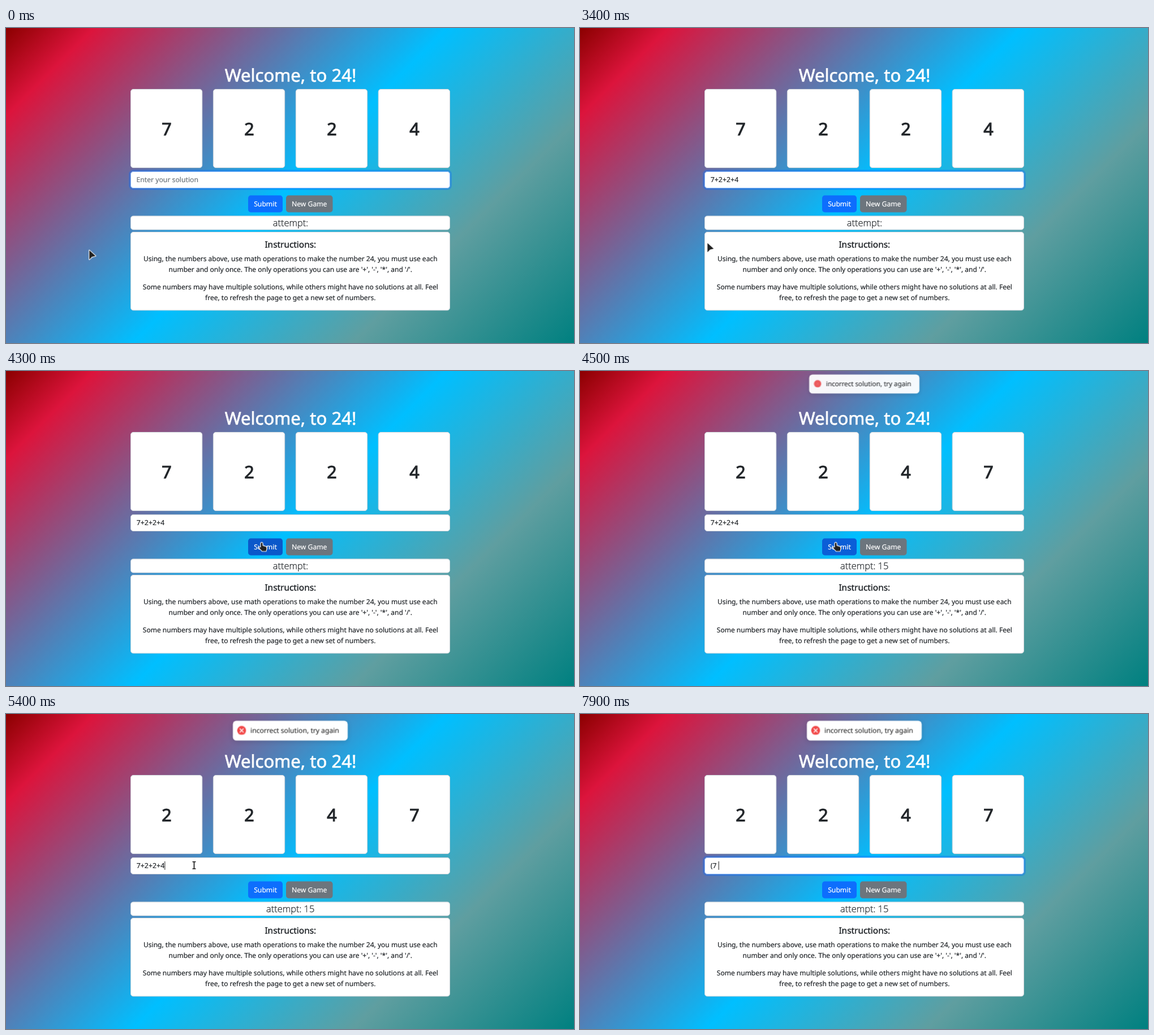
Write an HTML page that moves like this. It is 1004x558 px and loops after 8 s.

```html
<!DOCTYPE html>
<html lang="en">
<head>
<meta charset="utf-8">
<title>Welcome, to 24!</title>
<style>
html, body { margin: 0; width: 100%; height: 100%; overflow: hidden; }
body { background: linear-gradient(135deg, darkred, crimson 10%, deepskyblue 50%, cadetblue 75%, teal); }
svg { display: block; width: 1004px; height: 558px; }
text {
  font: 12.02px "Noto Sans", "Open Sans", sans-serif;
  fill: #212529; stroke: #212529; stroke-width: .2px;
  white-space: pre; text-rendering: geometricPrecision;
}
.mid { text-anchor: middle; }
.title { font-size: 31.1px; fill: #fff; stroke: #fff; stroke-width: .7px; }
.digits { font-size: 30.5px; stroke-width: 1px; }
.heading { font-size: 15.4px; stroke-width: .4px; }
.attempt { font: 300 16.4px "Open Sans", "Noto Sans", sans-serif; stroke-width: .25px; }
.label { font-size: 12.2px; fill: #fff; stroke: #fff; }
.entry { font-size: 12.4px; }
.picked { fill: #fff; stroke: #fff; }
.hint { font-size: 12.2px; fill: #6c757d; stroke: #6c757d; }
.notice { font-size: 12.15px; fill: #363636; stroke: #363636; }
.panel { fill: #fff; stroke: #ced4da; stroke-width: 1; }
.glow { fill: none; stroke: #0d6efd; stroke-opacity: .35; stroke-width: 3; }
.edge { fill: none; stroke: #86b7fe; }
.toast-box { fill: #fff; filter: drop-shadow(0 2px 4px rgba(0, 0, 0, .14)); }
.pointer path { stroke: #fff; stroke-width: 1.2; stroke-linejoin: round; paint-order: stroke; fill: #222; }

/* Every change is a hard step; 1% is 80 ms */
.step { animation: 8s step-end infinite; }
.hint { animation-name: hint; }
.first { animation-name: first; }
.second { animation-name: second; }
.selection { animation-name: selection; }
.cover { animation-name: cover; }
.caret { animation-name: caret; }
.before { animation-name: before; }
.after { animation-name: after; }
.focus { animation-name: focus; }
.submit { fill: #0d6efd; animation-name: submit; }
.toast { animation-name: toast; }
.icon { animation-name: icon; }
.cross { animation-name: cross; }
.pointer { animation-name: pointer; }
.arrow { animation-name: arrow; }
.hand { animation-name: hand; }
.beam { animation-name: beam; }

@keyframes hint { 0% { opacity: 1 } 11.25%, 100% { opacity: 0 } }
@keyframes first { 0%, 88.75%, 100% { opacity: 0 } 11.25% { opacity: 1 } }
@keyframes second { 0% { opacity: 0 } 88.75%, 100% { opacity: 1 } }
@keyframes selection { 0%, 88.75%, 100% { opacity: 0 } 72.5% { opacity: 1 } }
@keyframes before { 0% { opacity: 1 } 55%, 100% { opacity: 0 } }
@keyframes after { 0% { opacity: 0 } 55%, 100% { opacity: 1 } }
@keyframes cover {
  0% { transform: translateX(0) }
  11.25% { transform: translateX(7.1px) }
  15% { transform: translateX(14.2px) }
  20% { transform: translateX(21.3px) }
  23.75% { transform: translateX(28.4px) }
  27.5% { transform: translateX(35.5px) }
  35% { transform: translateX(49.6px) }
  88.75% { transform: translateX(3.7px) }
  95% { transform: translateX(10.9px) }
  97.5%, 100% { transform: translateX(14.1px) }
}
@keyframes caret {
  0%, 42.5%, 72.5% { opacity: 0 }
  11.25%, 67.5%, 88.75%, 100% { opacity: 1 }
}
@keyframes focus {
  0%, 70%, 100% { opacity: 1 }
  52.5% { opacity: .5 }
  53.75% { opacity: 0 }
  68.75% { opacity: .7 }
}
@keyframes submit {
  0%, 61.25%, 100% { fill: #0d6efd }
  48.75% { fill: #0c66ea }
  50%, 55% { fill: #0b5ed7 }
  52.5% { fill: #0a58ca }
}
@keyframes toast {
  0% { opacity: 0; transform: none }
  55% { opacity: .81; transform: translateY(-27px) scale(.85) }
  56.25% { opacity: .95; transform: translateY(-6.5px) scale(.96) }
  57.5%, 100% { opacity: 1; transform: none }
}
@keyframes icon {
  0% { opacity: 0; transform: scale(0) }
  56.25% { opacity: .9; transform: scale(.85) }
  57.5% { opacity: 1; transform: scale(1.04) }
  58.75%, 100% { opacity: 1; transform: none }
}
@keyframes cross {
  0% { opacity: 0; transform: scale(.5) }
  56.25% { opacity: .15; transform: scale(.6) }
  57.5% { opacity: 1; transform: scale(.8) }
  58.75%, 100% { opacity: 1; transform: none }
}
@keyframes pointer {
  0% { transform: translate(147.3px, 393.8px) }
  1.25% { transform: translate(144.3px, 387.8px) }
  42.5% { transform: translate(225.3px, 381px) }
  43.75% { transform: translate(264px, 371px) }
  45% { transform: translate(320px, 352px) }
  46.25% { transform: translate(374px, 333px) }
  47.5% { transform: translate(420px, 317px) }
  48.75% { transform: translate(446px, 308px) }
  50% { transform: translate(452px, 304.5px) }
  60% { transform: translate(446px, 302px) }
  61.25% { transform: translate(372px, 273px) }
  62.5% { transform: translate(336px, 269px) }
  63.75% { transform: translate(334px, 269px) }
  65%, 100% { transform: translate(332.5px, 268px) }
}
@keyframes arrow { 0%, 42.5% { opacity: 1 } 12.5%, 48.75%, 100% { opacity: 0 } }
@keyframes hand { 0%, 61.25%, 100% { opacity: 0 } 48.75% { opacity: 1 } }
@keyframes beam { 0%, 90%, 100% { opacity: 0 } 61.25% { opacity: 1 } }
</style>
</head>
<body>
<svg viewBox="0 0 1004 558">
  <defs><rect id="card" class="panel" y="108.5" width="126.3" height="139" rx="4.5"/></defs>

  <text class="title mid" x="503" y="95">Welcome, to 24!</text>
  <use href="#card" x="220.5"/><use href="#card" x="366.4"/>
  <use href="#card" x="512.3"/><use href="#card" x="658.2"/>
  <text class="digits mid step before" x="284 430 576 722" y="190">7224</text>
  <text class="digits mid step after" x="284 430 576 722" y="190">2247</text>

  <rect class="panel" x="220.5" y="254.5" width="564" height="29" rx="4.5"/>
  <g class="step focus">
    <rect class="glow" x="218.5" y="252.5" width="568" height="33" rx="6.5"/>
    <rect class="edge" x="220.5" y="254.5" width="564" height="29" rx="4.5"/>
  </g>
  <text class="entry step first" x="230.7" y="273">7+2+2+4</text>
  <text class="entry step second" x="230.7" y="273">(7 </text>
  <g class="step cover">
    <rect x="230.5" y="258" width="56" height="22" fill="#fff"/>
    <rect class="step caret" x="230.6" y="261" width="1" height="15" fill="#111"/>
  </g>
  <text class="hint step" x="230.5" y="273">Enter your solution</text>
  <g class="step selection">
    <rect x="231" y="261" width="49.5" height="15" fill="#1e98d7"/>
    <text class="entry picked" x="230.7" y="273">7+2+2+4</text>
  </g>

  <rect class="step submit" x="428" y="296.5" width="61" height="30" rx="4.7"/>
  <rect x="495" y="296.5" width="82.5" height="30" rx="4.7" fill="#6c757d"/>
  <text class="label mid" x="458.5" y="315.5">Submit</text>
  <text class="label mid" x="536.2" y="315.5">New Game</text>

  <rect class="panel" x="220.5" y="333" width="564" height="24.2" rx="4.5"/>
  <text class="attempt mid step before" x="503" y="350.5">attempt:</text>
  <text class="attempt mid step after" x="502.7" y="350.5">attempt: 15</text>

  <rect class="panel" x="220.5" y="361.5" width="564" height="138.5" rx="4.5"/>
  <text class="heading mid" x="502.8" y="389">Instructions:</text>
  <g class="mid">
    <text x="502.8" y="412.5">Using, the numbers above, use math operations to make the number 24, you must use each</text>
    <text x="502.8" y="431.5">number and only once. The only operations you can use are '+', '-', '*', and '/'.</text>
    <text x="502.8" y="462.7">Some numbers may have multiple solutions, while others might have no solutions at all. Feel</text>
    <text x="502.8" y="481.7">free, to refresh the page to get a new set of numbers.</text>
  </g>

  <g transform="translate(502.5 29.5)">
    <g class="step toast">
      <rect class="toast-box" x="-101.5" y="-17.5" width="203" height="35" rx="6.3"/>
      <g transform="translate(-86 -.4)">
        <g class="step icon">
          <circle r="7.9" fill="#f24747"/>
          <path class="step cross" d="M-3 -3L3 3M3 -3L-3 3" stroke="#fff" stroke-width="1.5" stroke-linecap="round"/>
        </g>
      </g>
      <text class="notice" x="-70.5" y="4">incorrect solution, try again</text>
    </g>
  </g>

  <g class="step pointer">
    <path class="step arrow" d="M0 0V16.2L4.6 11.6L11 10Z" style="stroke-width:2.2"/>
    <path class="step hand" d="M-1.5 .5Q0 -1.2 1.5 .5V5L7 6.8Q9 7.6 8.6 10L7.5 14.5H1L-4.2 9Q-4.8 7 -2.6 7.4L-1.5 8.2Z" style="stroke-width:2.2"/>
    <path class="step beam" d="M-3 -7H3V-5.5H.9V5.5H3V7H-3V5.5H-.9V-5.5H-3Z"/>
  </g>
</svg>
</body>
</html>
```
